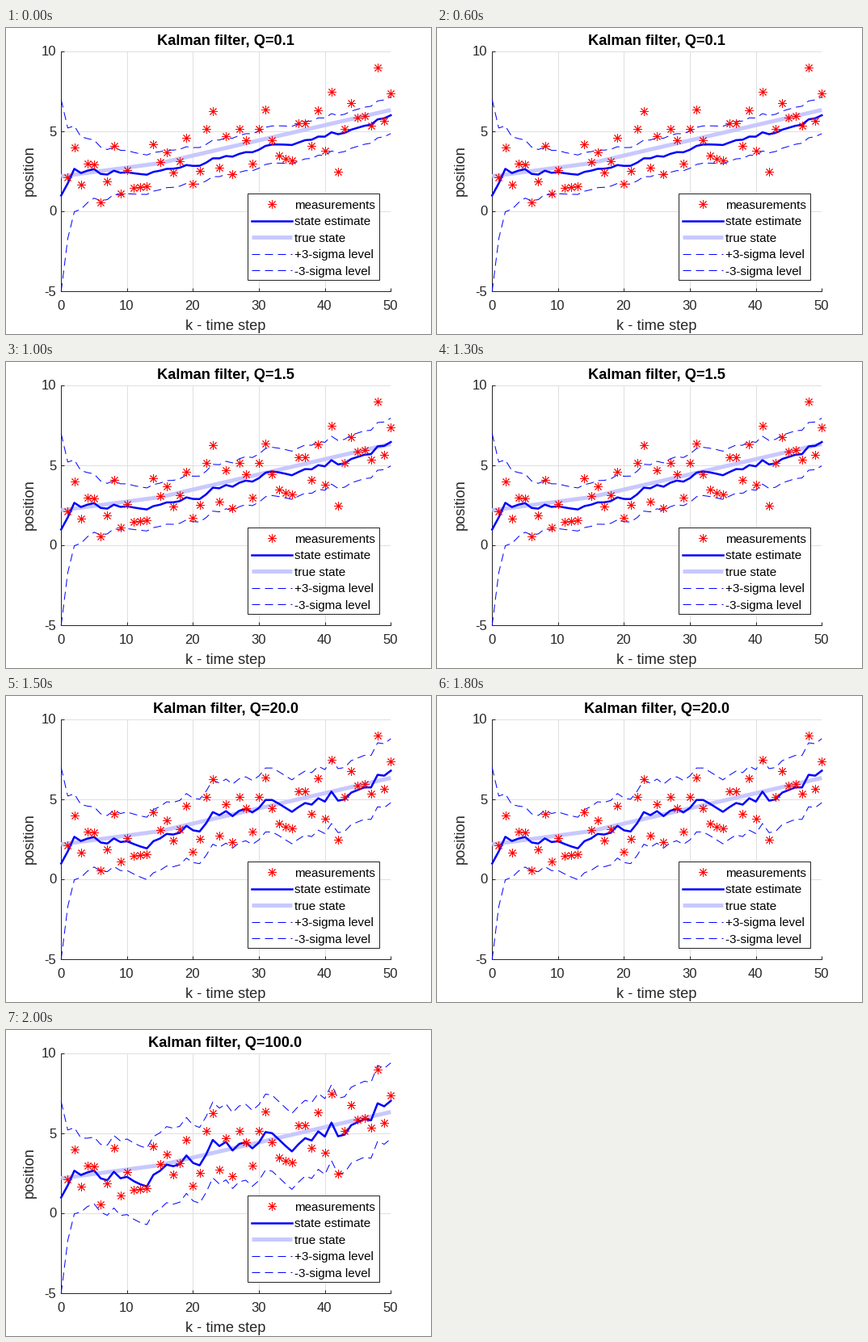
These frames come from a looping animation (526 px wide and 379 px high, 2500 ms). A matplotlib script:

```python
import numpy as np
import matplotlib.pyplot as plt
from matplotlib.animation import FuncAnimation
from matplotlib.lines import Line2D
from matplotlib.patches import Rectangle
from matplotlib.transforms import Affine2D

W, H, DPI = 526, 379, 128
PX = 72 / DPI                       # one pixel in points
INK, BLUE = "#262626", "#0000ff"
LEFT, TOP, WIDE, TALL = 68.25, 29.25, 408, 297

plt.rcParams["font.family"] = "Liberation Sans"

NOISE = [0.1, 0.1, 1.5, 20, 100]    # the first value is held twice as long
DT, R = 0.1, 2.0

steps = np.arange(51)
# The object moves steadily, then faster after step 15
true_state = 2.2 + 0.055 * steps + 0.04 * np.maximum(steps - 15, 0)
# Sensor readings, the only raw data: all curves are computed from them
measured = np.array([
    2.12, 3.99, 1.67, 2.98, 2.93, 0.56, 1.87, 4.09, 1.11, 2.58,
    1.46, 1.52, 1.60, 4.19, 3.08, 3.69, 2.42, 3.13, 4.60, 1.72,
    2.53, 5.15, 6.26, 2.73, 4.70, 2.35, 5.15, 4.44, 2.98, 5.18,
    6.36, 4.44, 3.48, 3.28, 3.18, 5.53, 5.53, 4.09, 6.31, 3.81,
    7.50, 2.50, 5.15, 6.77, 5.86, 5.98, 5.35, 8.99, 5.66, 7.37])


def kalman(q):
    """Position estimate and its 3-sigma width for a constant-velocity model."""
    F = np.array([[1, DT], [0, 1]])
    g = np.array([DT ** 2 / 2, DT])
    x, P = np.array([1.0, 0.3]), np.diag([4.0, 0.05])
    pos, var = [x[0]], [P[0, 0]]
    for z in measured:
        x, P = F @ x, F @ P @ F.T + q * np.outer(g, g)
        K = P[:, 0] / (P[0, 0] + R)
        x, P = x + K * (z - x[0]), P - np.outer(K, P[0])
        pos.append(x[0])
        var.append(P[0, 0])
    return np.array(pos), 3 * np.sqrt(var)


fig = plt.figure(figsize=(W / DPI, H / DPI), dpi=DPI, facecolor="white")
pixels = Affine2D().scale(1 / W, -1 / H).translate(0, 1) + fig.transFigure


def label(x, y, s, size, **kw):
    kw = {"ha": "center", "va": "baseline", "color": INK, **kw}
    return fig.text(x, y, s, fontsize=size * PX, transform=pixels, **kw)


# Axes
ax = fig.add_axes([LEFT / W, 1 - (TOP + TALL) / H, WIDE / W, TALL / H])
xticks, yticks = range(0, 51, 10), range(-5, 11, 5)
ax.set(xlim=(0, 50), ylim=(-5, 10), xticks=xticks, yticks=yticks)
ax.set_axisbelow(True)
ax.grid(color="#dfdfdf", lw=PX)
ax.tick_params(direction="in", length=4 * PX, width=PX, color=INK,
               labelbottom=False, labelleft=False)
ax.spines[["top", "right"]].set_visible(False)
for side in ("left", "bottom"):
    ax.spines[side].set(linewidth=PX, color=INK)

for v in xticks:
    label(LEFT - 0.75 + v * WIDE / 50, 349, str(v), 16.67)
for v in yticks:
    label(62.5, TOP + 5.25 + (10 - v) * TALL / 15, str(v), 16.67, ha="right")
label(271.5, 374, "k - time step", 18.33)
label(33.5, 176.5, "position", 18.33, rotation=90, rotation_mode="anchor")
title = label(271.5, 21, "", 18.33, weight="bold", color="black")

# Curves
solid = dict(color=BLUE, lw=2.5 * PX)
thick = dict(color="#c8c8ff", lw=5 * PX, solid_capstyle="butt")
dashed = dict(color=BLUE, lw=PX, ls=(0, (10, 6)))
stars = dict(color="#ff0000", ls="none", marker=(8, 2, 0),
             ms=11 * PX, mew=0.9 * PX)


def curve(x, y, z, style):
    return ax.plot(x, y, zorder=z, clip_on=False, **style)[0]


curve(steps, true_state, 2.6, thick)
upper = curve([], [], 2.7, dashed)
lower = curve([], [], 2.7, dashed)
estimate = curve([], [], 2.8, solid)
curve(steps[1:], measured, 3, stars)

# Legend
fig.add_artist(Rectangle((299.25, 205.25), 163, 107, transform=pixels,
                         fc="white", ec=INK, lw=PX))
rows = [("measurements", stars), ("state estimate", solid),
        ("true state", thick), ("+3-sigma level", dashed),
        ("-3-sigma level", dashed)]
for i, (name, style) in enumerate(rows):
    y = 218 + 20.6 * i
    xs = [329] if style is stars else [304.25, 353.75]
    fig.add_artist(Line2D(xs, [y] * len(xs), transform=pixels, **style))
    label(357, y + 5.5, name, 15.1, ha="left", color="black")


def update(i):
    q = NOISE[i]
    pos, band = kalman(q)
    for line, y in ((estimate, pos), (upper, pos + band), (lower, pos - band)):
        line.set_data(steps, y)
    title.set_text(f"Kalman filter, Q={q:.1f}")
    return estimate, upper, lower, title


anim = FuncAnimation(fig, update, frames=len(NOISE), interval=500,
                     repeat=True, repeat_delay=0, blit=False)
plt.show()
```
